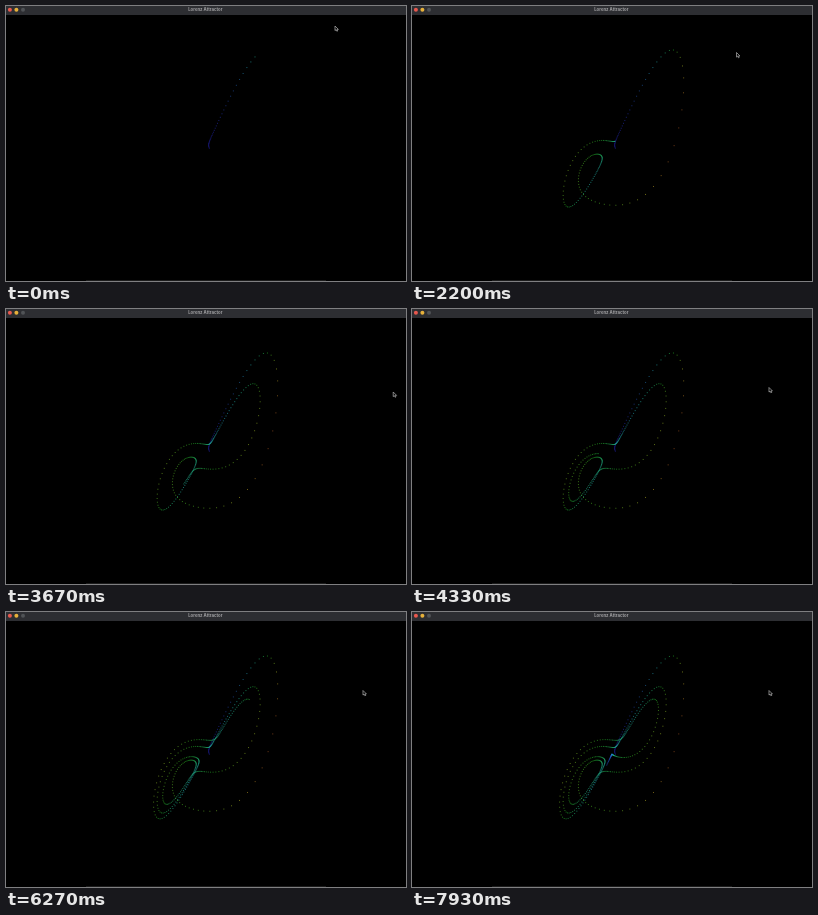
An HTML page with a canvas for the animation above (8000 ms loop, 400 px wide and 275 px high).

```html
<!DOCTYPE html>
<html lang="en">
<head>
<meta charset="utf-8">
<title>Lorenz Attractor</title>
<style>
  html, body { margin: 0; width: 100%; height: 100%; overflow: hidden; background: #000; }
  canvas, svg { position: absolute; left: 0; top: 0; width: 400px; height: 275px; }
  text { font: 700 4.3px Inter, sans-serif; fill: #a2a2a4; text-anchor: middle; }
</style>
</head>
<body>
<canvas id="plot" width="400" height="275"></canvas>
<svg viewBox="0 0 400 275">
  <rect width="400" height="9" fill="#2d2e32"/>
  <rect x="80" y="274" width="240" height="1" fill="#1c1c1c"/>
  <circle cx="3.9" cy="3.7" r="2" fill="#e8584e"/>
  <circle cx="10.4" cy="3.7" r="2" fill="#e6b03a"/>
  <circle cx="17" cy="3.7" r="2" fill="#505356"/>
  <text x="199.3" y="5.2">Lorenz Attractor</text>
  <path id="cursor" d="M0 0V4.6L1.1 3.6L1.9 5.3L2.7 4.9L2 3.4H3.4Z"
        fill="#000" stroke="#b4b4b4" stroke-width=".7"/>
</svg>
<script>
const LOOP = 8000, FRAME = LOOP / 120;
const STEPS_PER_FRAME = 4, FIRST_STEPS = 34, LAST_STEPS = 510;
const SCALE = 10 / 3, CENTER_X = 200, CENTER_Y = 142.2;
const SIGMA = 10, RHO = 28, BETA = 8 / 3, DT = 0.01;

const ctx = document.getElementById("plot").getContext("2d");
const cursor = document.getElementById("cursor");

// Cursor keys: time in ms, x, y
const cursorPath = [
  [0, 329, 20], [1500, 329, 20], [1730, 324.5, 46.5], [2620, 324.5, 46.5],
  [2870, 361, 75.5], [3300, 391, 84], [3560, 394, 84], [3950, 357, 78.5], [LOOP, 357, 78.5]
];

// Plain Euler integration, one dot per step, hue following height z
function lorenzDots(count) {
  let x = 1, y = 0, z = 0;
  const dots = [];
  for (let i = 0; i <= count; i++) {
    dots.push({
      x: CENTER_X + SCALE * x,
      y: CENTER_Y - SCALE * y,
      color: `hsl(${240 - 4 * z}, 65%, 48%)`
    });
    const dx = SIGMA * (y - x), dy = x * (RHO - z) - y, dz = x * y - BETA * z;
    x += dx * DT;
    y += dy * DT;
    z += dz * DT;
  }
  return dots;
}

function cursorAt(time) {
  const next = Math.max(1, cursorPath.findIndex(key => key[0] >= time));
  const [t0, x0, y0] = cursorPath[next - 1], [t1, x1, y1] = cursorPath[next];
  const p = (time - t0) / (t1 - t0), ease = p * p * (3 - 2 * p);
  return [x0 + (x1 - x0) * ease, y0 + (y1 - y0) * ease];
}

const dots = lorenzDots(LAST_STEPS);

function draw(now) {
  const frame = Math.floor((now % LOOP) / FRAME + 0.1) % 120;
  const last = FIRST_STEPS + STEPS_PER_FRAME * frame;
  ctx.clearRect(0, 0, 400, 275);
  ctx.globalAlpha = 0.55;
  for (const dot of dots.slice(0, last + 1)) {
    ctx.fillStyle = dot.color;
    ctx.fillRect(dot.x - 0.5, dot.y - 0.5, 1, 1);
  }
  cursor.setAttribute("transform", `translate(${cursorAt(frame * FRAME)})`);
}

const start = performance.now();
function tick() {
  draw(performance.now() - start);
  requestAnimationFrame(tick);
}
tick();
</script>
</body>
</html>
```
